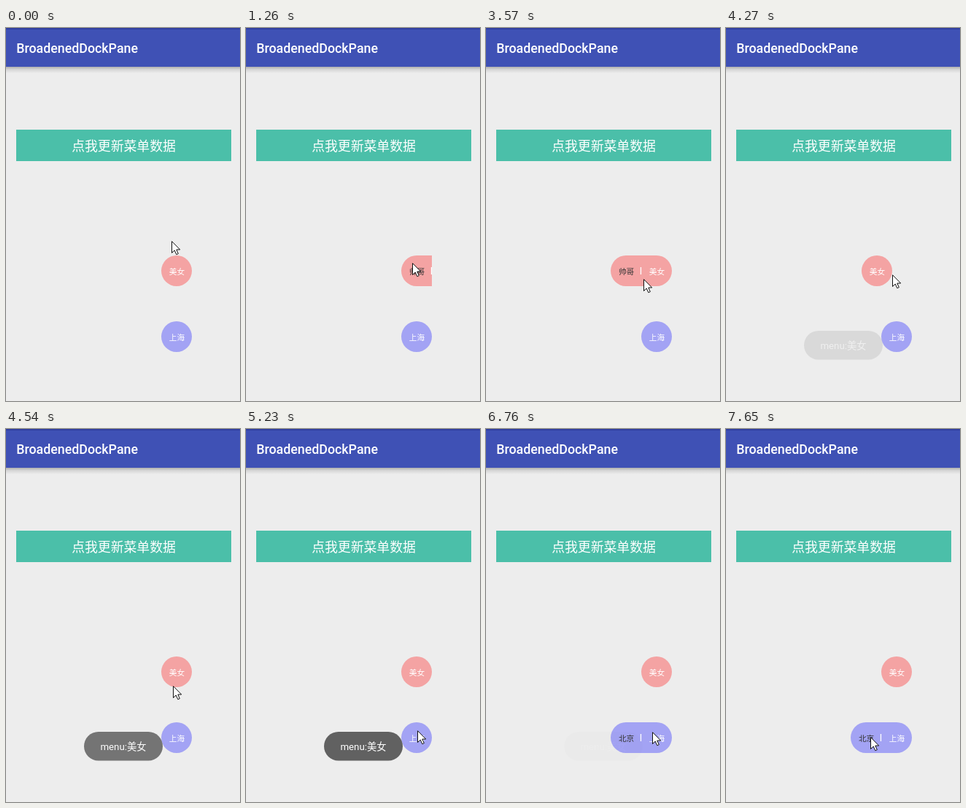
These frames come from a looping animation (321x510 px, 8 s). An HTML page:

```html
<!DOCTYPE html>
<html lang="zh-CN">
<head>
<meta charset="utf-8">
<title>Menu demo</title>
<style>
  html, body { margin: 0; width: 100%; height: 100%; overflow: hidden; background: #ededed; }
  #stage { display: block; width: 321px; height: 510px; }
  text { font-family: Roboto, "Noto Sans CJK SC", "Noto Sans CJK", sans-serif; fill: #fff; }
  .mid { text-anchor: middle; }
  .label { font-size: 10.7px; text-anchor: middle; }
  .dark { fill: #333; }
</style>
</head>
<body>
<svg id="stage" viewBox="0 0 321 510">
  <defs>
    <linearGradient id="shade" x2="0" y2="1">
      <stop offset="0" stop-color="#000" stop-opacity=".27"/>
      <stop offset=".4" stop-color="#000" stop-opacity=".1"/>
      <stop offset="1" stop-color="#000" stop-opacity="0"/>
    </linearGradient>
  </defs>
  <rect width="321" height="510" fill="#ededed"/>
  <rect y="53" width="321" height="9" fill="url(#shade)"/>
  <rect width="321" height="53" fill="#3f51b5"/>
  <rect width="321" height="2" fill="#303f9f"/>
  <text x="14.3" y="34.3" font-size="17.8" font-weight="500">BroadenedDockPane</text>
  <rect x="14" y="139" width="295" height="43" fill="#4bbfa9"/>
  <text class="mid" x="161.5" y="167.6" font-size="17.85">点我更新菜单数据</text>
  <g id="menus"></g>
  <g id="toast" opacity="0">
    <rect x="107" y="414" width="108" height="39.5" rx="19.75" fill="#616161"/>
    <text class="mid" x="161" y="439" font-size="13.3">menu:美女</text>
  </g>
  <path id="cursor" d="M.5 .7V16.5L4.2 13L6.8 18.7L9.3 17.6L6.8 12H11.7Z" fill="#fff" stroke="#111"/>
</svg>
<script>
const LOOP = 8000, RIGHT = 255, SIZE = 42;
const $ = id => document.getElementById(id);

// Screen refreshes: start, end, count
const RUNS = [
  [0, 0, 1], [150, 420, 3], [1260, 1530, 3], [1930, 2500, 5], [2910, 3840, 8],
  [4120, 5080, 8], [5230, 5230, 1], [6100, 7060, 8], [7220, 7220, 1], [7650, 7650, 1]
];
const ticks = RUNS.flatMap(([a, b, n]) =>
  Array.from({ length: n }, (_, k) => a + (n > 1 ? Math.floor(k * (b - a) / (n - 1) / 10) * 10 : 0)));

// Pointer path: time, x, y
const PATH = [
  [0, 227, 291], [140, 227, 291], [420, 228, 321], [1800, 228, 321], [2500, 227, 414.5],
  [2780, 227, 414.5], [3300, 218, 360], [3560, 216, 343], [3840, 228, 337],
  [4400, 228, 337], [5080, 235, 411], [5230, 235, 412], [6500, 235, 412],
  [7060, 208, 421], [7220, 202, 421], [7640, 202, 421], [7650, 198, 421]
];

const clamp = p => Math.min(1, Math.max(0, p));
const ease = (t, start, span) => (1 - Math.cos(Math.PI * clamp((t - start) / span))) / 2;

function pointer(t) {
  let i = 0;
  while (i < PATH.length - 2 && PATH[i + 1][0] <= t) i++;
  const [t0, x0, y0] = PATH[i], [t1, x1, y1] = PATH[i + 1];
  const p = clamp((t - t0) / (t1 - t0));
  return [Math.round(x0 + (x1 - x0) * p), Math.round(y0 + (y1 - y0) * p)];
}

function makeMenu(y, color, first, second) {
  const view = document.createElementNS("http://www.w3.org/2000/svg", "svg");
  view.setAttribute("y", y);
  view.setAttribute("height", SIZE);
  view.setAttribute("overflow", "hidden");
  view.innerHTML = `
    <rect height="${SIZE}" rx="21" fill="${color}"/>
    <g>
      <text class="label dark" x="21.6" y="26.4">${first}</text>
      <rect x="40.8" y="16" width="1.3" height="10" fill="#fff"/>
      <text class="label" x="63.4" y="26.4">${second}</text>
    </g>
    <text class="label" x="21.4" y="26.4">${second}</text>`;
  $("menus").append(view);
  const [pill, open, closed] = view.children;
  return (isOpen, spread) => {
    const w = SIZE * (1 + spread);
    view.setAttribute("x", RIGHT - w);
    view.setAttribute("width", w);
    pill.setAttribute("width", isOpen ? SIZE * 2 : SIZE);
    open.style.display = isOpen ? "" : "none";
    closed.style.display = isOpen ? "none" : "";
  };
}

const pink = makeMenu(311, "#f4a3a3", "帅哥", "美女");
const blue = makeMenu(401, "#a3a3f4", "北京", "上海");

function draw(t) {
  pink(t >= 1260 && t < 4120, ease(t, 1260, 270) - ease(t, 4120, 319));
  blue(t >= 6100, ease(t, 6100, 270));
  $("toast").setAttribute("opacity", ease(t, 4120, 540) - ease(t, 6175, 500));
  $("cursor").setAttribute("transform", `translate(${pointer(t)})`);
}

const start = performance.now();
function frame() {
  const t = (performance.now() - start) % LOOP;
  draw(ticks.filter(k => k <= t).pop() || 0);
  requestAnimationFrame(frame);
}
frame();
</script>
</body>
</html>
```
